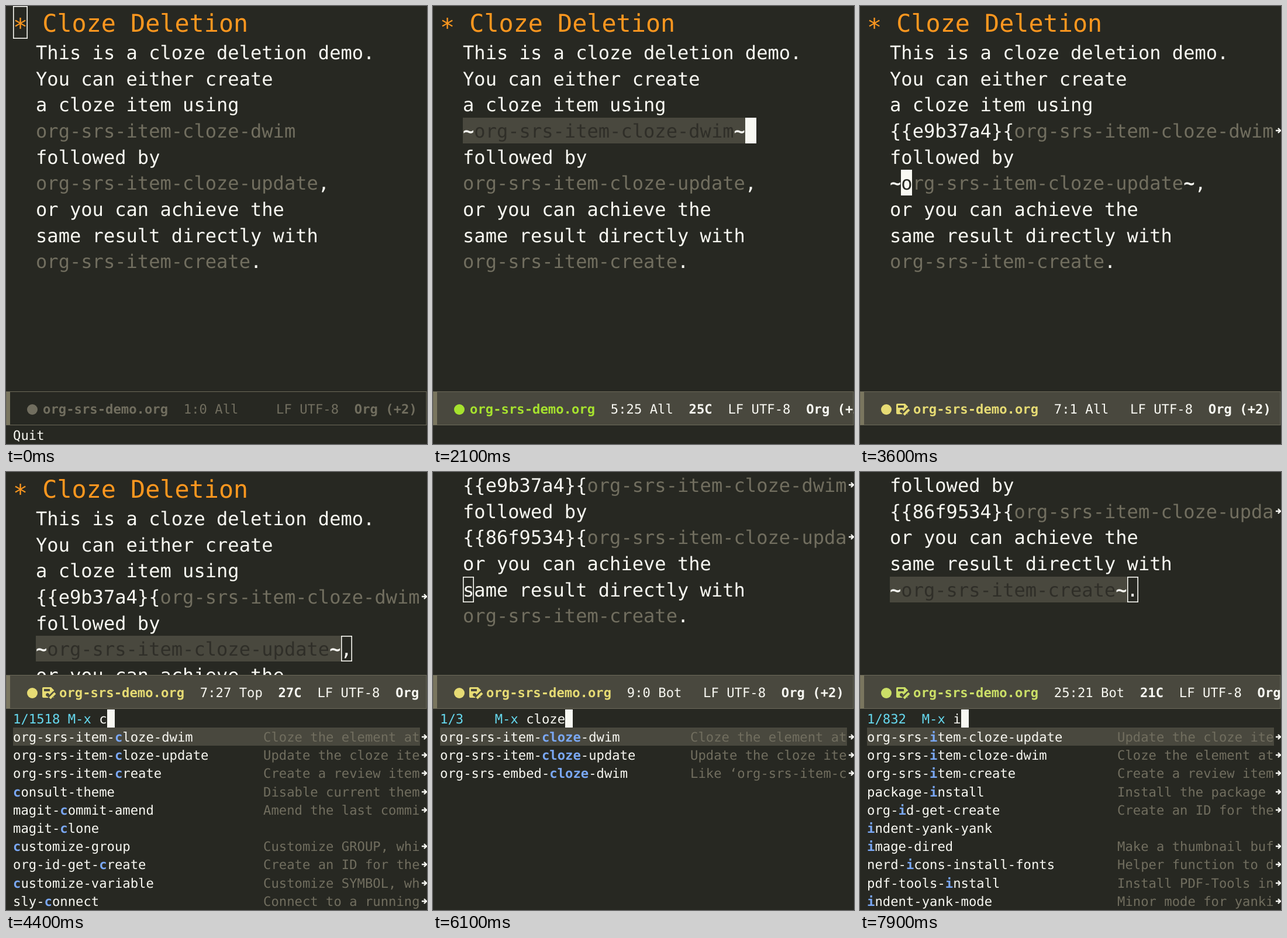
Write an HTML page that moves like this. It is 720x749 px and loops after 8 s.

```html
<!DOCTYPE html>
<html lang="en">
<head>
<meta charset="utf-8">
<title>Cloze deletion demo</title>
<style>
html, body { margin: 0; width: 100%; height: 100%; overflow: hidden; background: #272822; }
svg { display: block; }
text { font-family: "DejaVu Sans Mono", "Noto Sans Mono", monospace; white-space: pre;
  font-variant-ligatures: none; text-rendering: geometricPrecision; }
</style>
</head>
<body>
<svg id="stage" width="720" height="749" viewBox="0 0 720 749"></svg>
<script>
const BG = '#272822', FG = '#f8f8f2', GREY = '#716e5f', HL = '#49483e', ORANGE = '#fd971f',
  GREEN = '#a6e22e', YELLOW = '#e6db74', LIME = '#cbdf67', CYAN = '#66d9ef', BLUE = '#7aa8f5', PINK = '#ee2470';
const ADV = 0.602;                  // glyph advance per em
const BODY = 32.1, HEAD = 41.75, SMALL = 22.22;
const CW = BODY * ADV, SW = SMALL * ADV, ROW = 44.65, MINI = 31.2, COLS = 34;

const UPDATE = 'org-srs-item-cloze-update', DWIM = 'org-srs-item-cloze-dwim', CREATE = 'org-srs-item-create';
const DOCS = {
  [UPDATE]: 'Update the cloze items in the entry',
  [DWIM]: 'Cloze the element at point',
  [CREATE]: 'Create a review item',
  'org-srs-embed-cloze-dwim': 'Like ‘org-srs-item-cloze-dwim’',
  'clisp': 'Start a CLISP session',
  'tab-close': 'Close the tab specified',
  'clean-mode': 'A mode that removes all',
  'clone-frame': 'Make a new frame with',
  'magit-clean': 'Remove untracked files',
  'world-clock': 'Display a world clock',
  'clone-buffer': 'Create and return a twin',
  'consult-theme': 'Disable current themes',
  'magit-commit-amend': 'Amend the last commit',
  'customize-group': 'Customize GROUP, which',
  'org-id-get-create': 'Create an ID for the entry',
  'customize-variable': 'Customize SYMBOL, which',
  'sly-connect': 'Connect to a running Lisp',
  'package-install': 'Install the package PKG',
  'image-dired': 'Make a thumbnail buffer',
  'nerd-icons-install-fonts': 'Helper function to download',
  'pdf-tools-install': 'Install PDF-Tools in all',
  'indent-yank-mode': 'Minor mode for yanking'
};
const KEYS = { 'tab-close': 'C-x t 0', 'clone-frame': 'C-x 5 c', 'clone-buffer': 'C-x x n' };
const POOLS = {
  c: CREATE + ' consult-theme magit-commit-amend magit-clone customize-group org-id-get-create customize-variable sly-connect',
  cl: 'magit-clone clisp tab-close clean-mode clone-frame magit-clean world-clock clone-buffer org-srs-embed-cloze-dwim',
  i: CREATE + ' package-install org-id-get-create indent-yank-yank image-dired nerd-icons-install-fonts pdf-tools-install indent-yank-mode'
};
const COUNTS = { '': 9486, c: 1518, cl: 112, clo: 37, cloz: 3, cloze: 3, i: 832 };

// Each step changes part of the editor state from its time on.
const STEPS = [
  [0, { row: 0, col: 0, cursor: 'hollow', focus: false, echo: 'Quit', top: 0, ids: 0, drawers: 0,
        sel: 0, input: null, pick: 0, first: UPDATE, tint: GREEN }],
  [1200, { focus: true, cursor: '' }],
  [1400, { row: 1, cursor: 'box', echo: '' }],
  [1500, { row: 2 }],
  [1600, { row: 3 }],
  [1700, { row: 4 }],
  [1900, { col: 1 }],
  [2100, { col: 25, sel: 25 }],
  [2400, { input: '' }],
  [2600, { input: 'c' }],
  [2700, { input: 'cl' }],
  [2800, { input: 'clo' }],
  [2900, { input: 'cloz' }],
  [3000, { input: 'cloze' }],
  [3100, { pick: 1 }],
  [3200, { input: null, pick: 0, sel: 0, col: 0, ids: 1, tint: YELLOW, first: DWIM }],
  [3400, { row: 5 }],
  [3500, { row: 6 }],
  [3600, { col: 1 }],
  [4000, { col: 27, sel: 27 }],
  [4200, { input: '' }],
  [4400, { input: 'c' }],
  [4500, { input: 'cl' }],
  [4600, { input: 'clo' }],
  [4700, { input: 'cloze' }],
  [4900, { input: null, sel: 0, col: 0, ids: 2 }],
  [5100, { row: 7 }],
  [5300, { row: 8 }],
  [5700, { input: '', top: 4 }],
  [5800, { input: 'c' }],
  [5900, { input: 'cl' }],
  [6000, { input: 'clo' }],
  [6100, { input: 'cloze' }],
  [6300, { pick: 1 }],
  [6500, { input: null, pick: 0, top: 0, drawers: 2, row: 10, first: UPDATE, tint: LIME }],
  [6900, { row: 11 }],
  [7100, { col: 1 }],
  [7300, { col: 21, sel: 21 }],
  [7700, { input: '', top: 7 }],
  [7900, { input: 'i' }]
];

const rect = (x, y, w, h, fill, more = '') =>
  `<rect x="${x}" y="${y}" width="${w}" height="${h}" fill="${fill}" ${more}/>`;
const text = (x, y, size, ...runs) => `<text x="${x}" y="${y}" font-size="${size}">` +
  runs.map(([s, fill, bold]) => `<tspan fill="${fill}"${bold ? ' font-weight="700"' : ''}>${s}</tspan>`).join('') + '</text>';
const arrow = y => `<path d="M711 ${y}h8m-4 -4l4 4l-4 4" fill="none" stroke="${FG}" stroke-width="2.4"/>`;

function bufferRows(s) {
  const cloze = (id, name, on) => on ? `{{${id}}{~${name}~}}` : `~${name}~`;
  return ['* Cloze Deletion',
    ...[':PROPERTIES:...', ':SRSITEMS:...'].slice(0, s.drawers),
    'This is a cloze deletion demo.', 'You can either create', 'a cloze item using',
    cloze('e9b37a4', DWIM, s.ids > 0), 'followed by',
    cloze('86f9534', UPDATE, s.ids > 1) + ',', 'or you can achieve the',
    'same result directly with', `~${CREATE}~.`];
}

// Splits a line into coloured runs cut at the window edge.
function bodyRuns(line, showMarks, selected) {
  const runs = [];
  let left = COLS;
  const add = (s, ...style) => { s = s.slice(0, left); left -= s.length; if (s) runs.push([s, ...style]); };
  if (line[0] === ':') add(line, GREY);
  else line.split('~').forEach((part, i) => {
    if (i && showMarks) add('~', FG, true);
    add(part, i % 2 ? (selected ? '#2f2e28' : GREY) : FG);
  });
  return runs;
}

function drawBuffer(s) {
  const rows = bufferRows(s), limit = s.input === null ? 659 : 347;
  let out = '';
  rows.forEach((line, i) => {
    const y = Math.round(s.top ? (i - s.top) * ROW : i ? 57 + (i - 1) * ROW : 0);
    if (y < 0 || y >= limit) return;
    const here = i === s.row, x = i ? 51 : 12, size = i ? BODY : HEAD;
    const base = y + (i ? 33.5 : 43.5), w = size * ADV, h = i ? 44 : 56;
    const marks = here && !line.startsWith('{{');
    const runs = i ? bodyRuns(line, marks, here && s.sel) : [[line, ORANGE]];
    if (here && s.sel) out += rect(x, y, s.sel * CW, h, HL);
    // The heading star sits lower than the font's raised asterisk.
    out += i ? text(x, base, size, ...runs)
      : text(x, base + 7, size, ['*', ORANGE]) + text(x + 2 * w, base, size, [line.slice(2), ORANGE]);
    if (line.startsWith('{{')) out += arrow(y + 22);
    if (!here || !s.cursor) return;
    const cx = Math.round(x + s.col * w), cw = Math.round(w);
    if (s.cursor === 'hollow' || s.input !== null)
      out += rect(cx + .8, y + .8, cw - 1.6, h - 1.6, 'none', `stroke="${FG}" stroke-width="1.6"`);
    else
      out += rect(cx, y, cw, h, FG) + text(x + s.col * w, base, size, [runs.map(r => r[0]).join('')[s.col] || ' ', BG]);
  });
  return out;
}

function drawModeLine(s, y) {
  const ink = s.focus ? FG : GREY, tint = s.focus ? s.tint : GREY, base = y + 38, mid = y + 31;
  const changed = s.ids > 0, x = changed ? 91 : 63;
  const line = s.row + 1 + (s.drawers ? 13 : 0);
  const pos = `${line}:${s.col} ${s.input === null ? 'All' : s.top ? 'Bot' : 'Top'}`;
  const posX = x + 18 * SW, selX = posX + (pos.length + 2) * SW;
  const rightX = s.sel ? selX + (`${s.sel}C`.length + 2) * SW : 462;
  let out = rect(0, y, 720, 749 - y, BG) +
    rect(.5, y + .5, 718.5, 57, s.focus ? HL : BG, 'stroke="#6d6a5a"') +
    rect(1, y + 1, 6, 56, '#7a765f') +
    `<circle cx="45" cy="${mid}" r="9" fill="${tint}"/>`;
  if (changed) out += `<g transform="translate(62 ${mid - 10})" fill="${tint}">
    <path fill-rule="evenodd" d="M2 0H15L20 5V18H2Q0 18 0 16V2Q0 0 2 0ZM3 3V7H13V3ZM9 10a3 3 0 1 0 .1 0Z"/>
    <path d="M12 19L22 9" stroke="${HL}" stroke-width="8"/><path d="M13 19L22 10" stroke="${tint}" stroke-width="4"/></g>`;
  out += text(x, base, SMALL, ['org-srs-demo.org', tint, true]) + text(posX, base, SMALL, [pos, ink]);
  if (s.sel) out += text(selX, base, SMALL, [`${s.sel}C`, ink, true]);
  return out + text(rightX, base, SMALL, ['LF UTF-8  ', ink], ['Org (+2)', ink, true]);
}

function candidates(s) {
  const pool = POOLS[s.input.slice(0, 2)] || POOLS.c;
  const pair = s.first === DWIM ? [DWIM, UPDATE] : [UPDATE, DWIM];
  return [...pair, ...pool.split(' ')].filter(n => n.includes(s.input)).slice(0, 10);
}

function drawMini(s) {
  const count = `${s.pick + 1}/${COUNTS[s.input]}`;
  let out = text(12, 429.5, SMALL, [count.padEnd(7) + 'M-x ', CYAN], [s.input, FG]) +
    rect(Math.round(12 + (11 + s.input.length) * SW), 406, 13, 31, FG);
  candidates(s).forEach((name, i) => {
    const y = Math.round(437 + i * MINI), at = name.indexOf(s.input), end = at + s.input.length, doc = DOCS[name];
    if (i === s.pick) out += rect(12, y, 696, 31, HL);
    out += text(12, y + 23.5, SMALL, [name.slice(0, at), FG], [name.slice(at, end), BLUE, true],
      [name.slice(end), FG], [KEYS[name] ? ` (${KEYS[name]})` : '', PINK]);
    if (doc) out += text(12 + 32 * SW, y + 23.5, SMALL, [doc.slice(0, 20), GREY]) + arrow(y + 16);
  });
  return out;
}

function draw(s) {
  const open = s.input !== null;
  return rect(0, 0, 720, 749, BG) + drawBuffer(s) + drawModeLine(s, open ? 347 : 659) +
    (open ? drawMini(s) : text(12, 741.5, SMALL, [s.echo, FG]));
}

const stage = document.getElementById('stage');
let shown = 0;
function tick() {
  const t = performance.now() % 8000;
  const past = STEPS.filter(([at]) => at <= t);
  if (past.length !== shown) {
    shown = past.length;
    stage.innerHTML = draw(Object.assign({}, ...past.map(step => step[1])));
  }
  requestAnimationFrame(tick);
}
tick();
</script>
</body>
</html>
```
